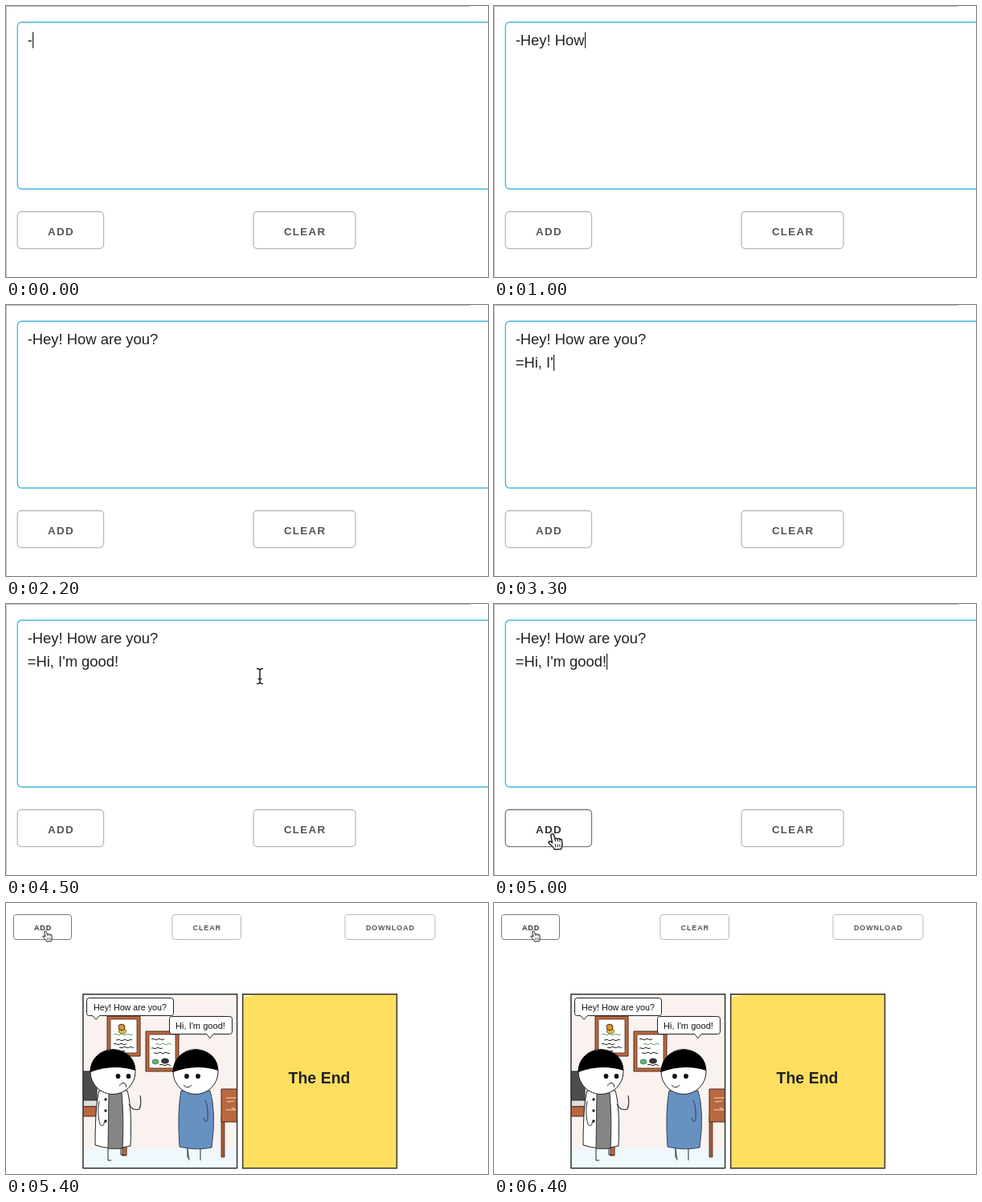
Recreate the animation shown at these times as an HTML page with a canvas. Size 600 px wide and 338 px high, loop 6500 ms.

```html
<!DOCTYPE html>
<html lang="en">
<head>
<meta charset="utf-8">
<title>Comic maker</title>
<style>
html, body { margin: 0; width: 100%; height: 100%; overflow: hidden; background: #fff; }
canvas { display: block; width: 600px; height: 338px; }
</style>
</head>
<body>
<canvas id="stage" width="600" height="338"></canvas>
<script>
const ctx = document.getElementById('stage').getContext('2d');
const LOOP = 6500, STEP = 100;
const SANS = '"Liberation Sans", Arial, sans-serif';
const INK = '#222';
const SCRIPT = "-Hey! How are you?\n=Hi, I'm good!";
// [time, characters typed]
const KEYS = [[0, 1], [200, 2], [1000, 9], [1700, 18], [2400, 19], [2600, 20], [3300, 26], [4000, 33]];

function typed(t) {
  for (let i = 1; i < KEYS.length; i++) {
    const [t0, n0] = KEYS[i - 1], [t1, n1] = KEYS[i];
    if (t < t1) return Math.floor(n0 + (n1 - n0) * (t - t0) / (t1 - t0));
  }
  return SCRIPT.length;
}

function paint(fill, stroke, width = 1) {
  if (fill) { ctx.fillStyle = fill; ctx.fill(); }
  if (stroke) { ctx.strokeStyle = stroke; ctx.lineWidth = width; ctx.stroke(); }
}
function rect(x, y, w, h, fill, stroke, width, r = 0) {
  ctx.beginPath();
  ctx.roundRect(x, y, w, h, r);
  paint(fill, stroke, width);
}
function oval(x, y, rx, ry, fill, stroke, width) {
  ctx.beginPath();
  ctx.ellipse(x, y, rx, ry, 0, 0, Math.PI * 2);
  paint(fill, stroke, width);
}
function shape(d, fill, stroke, width) {
  const p = new Path2D(d);
  if (fill) { ctx.fillStyle = fill; ctx.fill(p); }
  if (stroke) { ctx.strokeStyle = stroke; ctx.lineWidth = width || 1; ctx.stroke(p); }
}
function text(s, x, y, size, color = INK, weight = '', align = 'left', spacing = 0) {
  ctx.font = `${weight} ${size}px ${SANS}`;
  ctx.letterSpacing = spacing + 'px';
  ctx.textAlign = align;
  ctx.fillStyle = color;
  ctx.fillText(s, x, y);
}

function button(label, x, y, w, k, hover) {
  rect(x, y, w, 31 * k, '#fff', hover ? '#777' : '#b8b8b8', k > 1 ? 1.3 : 1, 3.2 * k);
  text(label, x + w / 2 + 0.45 * k, y + 19.6 * k, 9 * k, hover ? '#333' : '#555', 'bold', 'center', 0.88 * k);
}

function hand(x, y, k) {
  ctx.save();
  ctx.translate(x, y);
  ctx.scale(k, k);
  shape('M-1.5 1 Q-1.4 -.4 0 -.2 Q1 0 1.2 1.2 L2 4 Q3.1 3 4 4 Q5.3 3.2 6 4.4 Q7.4 3.8 7.8 5.4 ' +
    'L8 9 Q8 10.5 7 12.7 L1.6 13 Q.8 11 -1.2 9.4 L-3.3 7.4 Q-3.8 6 -2.2 6 L-.4 7.2 Z', '#fff', INK, 1);
  shape('M2 4 L2.4 6.2 M4 4.2 L4.3 6.3 M6 4.5 L6.1 6.5 M2.3 8.5 V11 M4.2 8.5 V11 M6 8.5 V11', null, INK, 0.7);
  ctx.restore();
}
function beam(x, y) {
  const d = `M${x - 4} ${y - 9.5} Q${x} ${y - 9.5} ${x} ${y - 7} Q${x} ${y - 9.5} ${x + 4} ${y - 9.5} ` +
    `M${x} ${y - 7} V${y + 7} M${x - 4} ${y + 9.5} Q${x} ${y + 9.5} ${x} ${y + 7} ` +
    `Q${x} ${y + 9.5} ${x + 4} ${y + 9.5} M${x - 2.5} ${y + 3.5} H${x + 2.5}`;
  shape(d, null, '#fff', 3.5);
  shape(d, null, INK, 1.5);
}
function arrow(x, y) {
  shape(`M${x} ${y} v16 l3.7 -3.5 l2.7 6 l2.8 -1.2 l-2.7 -5.9 h5 Z`, '#111', '#fff', 1.2);
}

function editor(t) {
  const k = 1.485;
  const p = Math.min(1, Math.max(0, (t - 4500) / 500));
  const e = p * p * (3 - 2 * p);
  const mx = 316 - 243 * e, my = 90 + 197 * e;
  const over = my > 256;

  rect(0, 0, 1, 338, '#c4c4c4');
  rect(0, 0, 578, 1, '#bdbdbd');
  rect(14.3, 20.3, 640, 208, '#fff', '#4ab8df', 1.4, 5);
  button('ADD', 14.2, 256.5, 107.3, k, over);
  button('CLEAR', 308, 256.5, 127, k);

  const lines = SCRIPT.slice(0, typed(t)).split('\n');
  lines.forEach((s, i) => text(s, 26.7, 49 + 29.4 * i, 18.4));
  const blink = (t >= 2200 && t < 2400) || (t >= 4500 && t < 5000);
  if (!blink) {
    const row = lines.length - 1;
    const x = 27 + ctx.measureText(lines[row]).width;
    rect(Math.round(x), 32.5 + 29.4 * row, 1.2, 20, INK);
  }
  if (t >= 4500) {
    if (over) hand(mx, my, k);
    else if (my > 229) arrow(mx, my);
    else beam(mx, my);
  }
}

function poster(x, y) {
  rect(x, y, 41, 50, '#b9683f', '#4a2a1c', 1);
  rect(x + 4, y + 4, 33, 42, '#fff', '#4a2a1c', 0.8);
}
function scribble(x, y, w, color = '#222') {
  let d = `M${x} ${y}`;
  for (let i = 2; i <= w; i += 2) d += ` L${x + i} ${y + Math.sin(i * 2.3 + y) * 0.8}`;
  shape(d, null, color, 1);
}
function head(x, eyes) {
  oval(x, 210.5, 28, 28, '#fff', '#222', 1);
  shape(`M${x - 28.3} 211 C${x - 28} 174 ${x + 28} 174 ${x + 28.3} 209 Q${x} 200 ${x - 28.3} 211 Z`, '#000');
  eyes.forEach(ex => oval(ex, 216, 2.9, 3.1, '#111'));
}
function bubble(x, y, w, tail, s, tx, size) {
  const b = y + 22;
  rect(x, y, w, 22, '#fff', '#222', 1, 3);
  shape(`M${tail - 5} ${b - 0.7} L${tail} ${b + 5} L${tail + 5} ${b - 0.7}`, '#fff', '#222', 1);
  rect(tail - 4.3, b - 1.5, 8.6, 1.5, '#fff');
  text(s, tx, y + 15, size, '#111');
}

function scene() {
  ctx.save();
  ctx.beginPath();
  ctx.rect(96, 114, 192, 217);
  ctx.clip();
  rect(96, 114, 192, 193, '#f9f2ef');
  rect(96, 306, 192, 25, '#eef8fd');

  poster(126, 141);
  oval(145, 160, 4.5, 3, '#e9bd3d', '#6b4a1d', 0.8);
  oval(144, 155, 4, 4, '#d6952f', '#4d351a', 1);
  scribble(134, 164, 25, '#58a66b');
  scribble(137, 171, 20);
  scribble(134, 176, 16);
  scribble(141, 180, 18);
  scribble(134, 185, 14);
  poster(174, 160);
  scribble(181, 170, 17);
  scribble(186, 176, 21, '#58a66b');
  scribble(181, 181, 15);
  scribble(184, 187, 20);
  oval(186, 198, 4, 3, '#68b47c', '#376b47', 0.8);
  oval(198, 197, 5, 3.5, '#333');
  scribble(191, 202, 14);

  // desk and computer
  rect(96, 210, 17, 36, '#4d4d4d', '#222', 1);
  rect(96, 246, 18, 8, '#ddd', '#333', 1);
  rect(95, 254, 55, 12, '#b9683f', '#4a2a1c', 1);
  rect(145, 266, 5, 49, '#b9683f', '#4a2a1c', 1);
  // board
  rect(268, 268, 4, 49, '#a95b36', '#4a2a1c', 0.8);
  rect(268, 232, 24, 41, '#b9683f', '#4a2a1c', 1);
  shape('M274 243 H287 M275 248 L284 247 M274 258 H286 M281 255 L286 258', null, '#f0d9c4', 1);

  // left figure
  shape('M127 304 V321 L131 321 M143 304 V314 L147 314', null, '#222', 1);
  shape('M116 234 Q111 252 111 302 Q132 309 155 303 Q157 255 151 234 Z', '#fff', '#222', 1);
  shape('M128 237 H144 Q147 270 145 306 Q136 307 127 306 Z', '#858585', '#333', 1);
  [245, 259, 272].forEach(y => oval(124, y, 1.6, 1.8, '#111'));
  shape('M116 247 Q113 262 117 276 Q121 281 123 272', null, '#333', 1);
  shape('M153 251 Q158 260 166 257 Q169 251 167 240', null, '#222', 1.1);
  head(133, [139.5, 152.5]);
  shape('M141 228 Q145 222 149 226 L150 230', null, '#222', 1);

  // right figure
  shape('M226 305 V318 M226 307 L228 321 M242 305 V321', null, '#333', 1);
  shape('M218 234 Q213 260 216 304 Q236 309 256 305 Q262 260 254 234 Z', '#6791c1', '#33435a', 1);
  shape('M248 246 Q252 255 251 270 Q249 276 246 268', null, '#2c3c54', 1);
  head(236, [225, 239]);
  shape('M221 227 Q226 233 231 227', null, '#222', 1);

  bubble(100.5, 118.5, 108, 112, 'Hey! How are you?', 109, 10.7);
  bubble(203.5, 141.5, 78, 254, "Hi, I'm good!", 211, 11.1);
  ctx.restore();
  rect(95.9, 113.8, 191.7, 217, null, '#333', 1.5);
}

function result(t) {
  button('ADD', 9.5, 14.5, 72, 1, true);
  button('CLEAR', 207, 14.5, 85.5, 1);
  button('DOWNLOAD', 422, 14.5, 112, 1);
  if (t >= 5400) {
    scene();
    rect(294.7, 113.8, 191.8, 217, '#fedf60', '#333', 1.5);
    shape('M296 115 H309 Q301 116 296 118 Z', '#fff8e0');
    text('The End', 390, 225, 19.5, INK, 'bold', 'center');
  }
  hand(49.2, 35, 1);
}

function draw(now) {
  const t = Math.floor((now % LOOP) / STEP) * STEP;
  ctx.fillStyle = '#fff';
  ctx.fillRect(0, 0, 600, 338);
  (t < 5200 ? editor : result)(t);
}

const start = performance.now();
function tick() {
  draw(performance.now() - start);
  requestAnimationFrame(tick);
}
tick();
</script>
</body>
</html>
```
